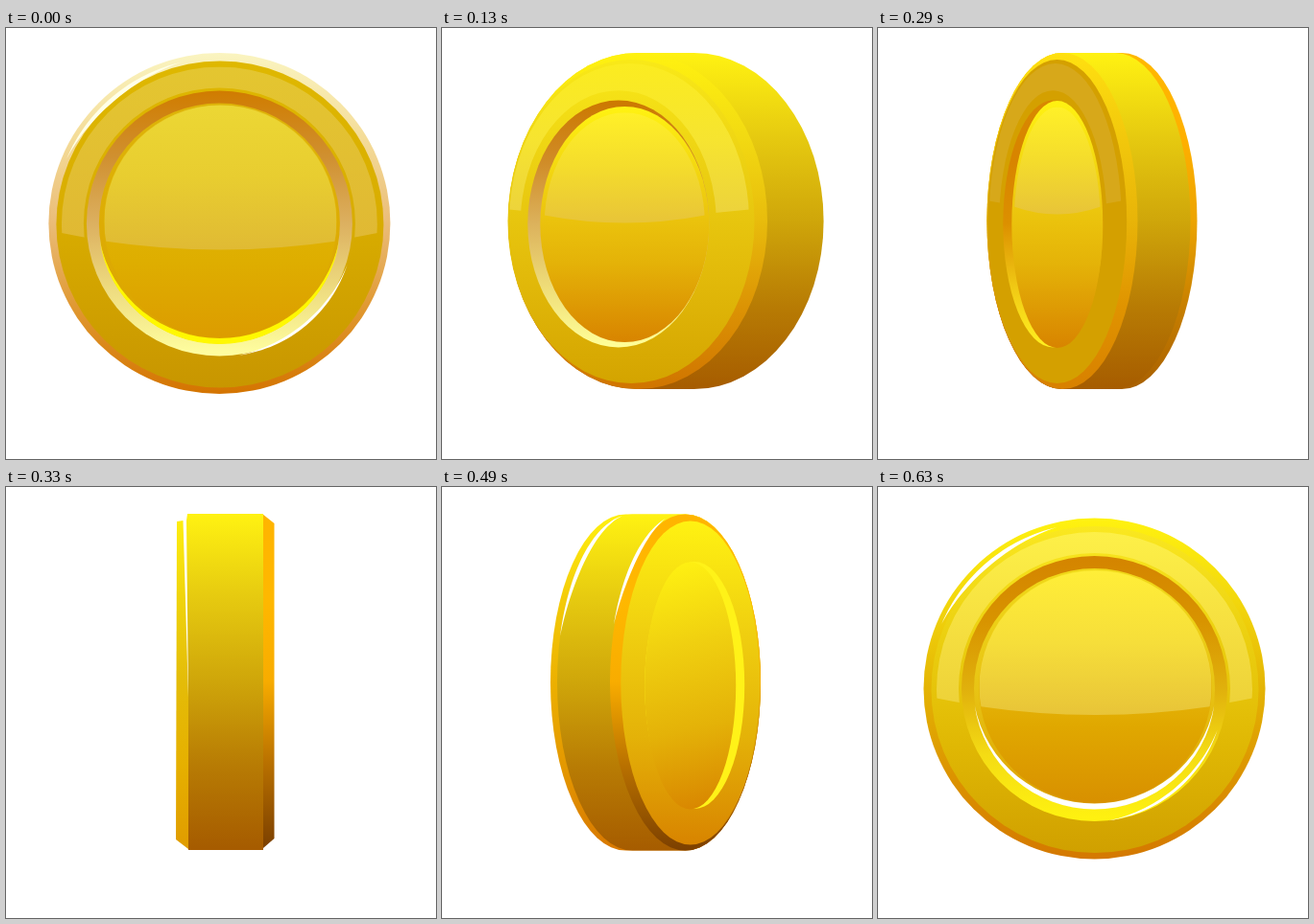
Write an HTML page with a canvas that moves like this. It is 448x450 px and loops after 660 ms.

```html
<!DOCTYPE html>
<html lang="en">
<head>
<meta charset="utf-8">
<title>Spinning coin</title>
<style>
html, body { margin: 0; width: 100%; height: 100%; overflow: hidden; background: #fff; }
canvas { display: block; }
</style>
</head>
<body>
<canvas id="stage" width="448" height="450"></canvas>
<script>
const ctx = document.getElementById('stage').getContext('2d');
const PI = Math.PI;

const METAL = ['#fff212', '#e6ca10', '#cfa60a', '#b87c04', '#a65c00'];
const GOLD = ['#fff212', '#f0d010', '#e4b208', '#d88400'];
const AMBER = ['#ffb400', '#ffb800', '#f8ac00', '#b87000', '#7c4000'];
const SHINE = ['#fff028', '#f4dc2c', '#e8c438'];

// Evenly spaced colour stops from top to bottom; lean tilts the axis.
function ramp(top, bottom, colors, x = 0, lean = 0) {
  const g = ctx.createLinearGradient(x - lean, top, x + lean, bottom);
  colors.forEach((c, i) => g.addColorStop(i / Math.max(1, colors.length - 1), c));
  return g;
}

// Ellipses are [cx, cy, rx, ry].
const circle = (x, y, r) => [x, y, r, r];
const scaled = ([x, y, rx, ry], k) => [x, y, rx * k, ry * k];

function trace([x, y, rx, ry]) {
  ctx.moveTo(x + rx, y);
  ctx.ellipse(x, y, rx, ry, 0, 0, 2 * PI);
}

function oval(e, colors, lean) {
  ctx.beginPath();
  trace(e);
  ctx.fillStyle = ramp(e[1] - e[3], e[1] + e[3], colors, e[0], lean);
  ctx.fill();
}

// Two equal ellipses joined by straight edges.
function barrel(xa, xb, y, rx, ry, colors) {
  ctx.beginPath();
  ctx.ellipse(Math.max(xa, xb), y, rx, ry, 0, -PI / 2, PI / 2);
  ctx.ellipse(Math.min(xa, xb), y, rx, ry, 0, PI / 2, PI * 1.5);
  ctx.fillStyle = ramp(y - ry, y + ry, colors);
  ctx.fill();
}

function poly(pts, colors) {
  ctx.beginPath();
  pts.forEach(p => ctx.lineTo(...p));
  ctx.fillStyle = ramp(28, 376, colors);
  ctx.fill();
}

// Thin highlight along an arc, angles in degrees, tapering at both ends.
function sliver([x, y, rx, ry], from, to, width, color = '#fff') {
  const n = 32;
  const at = (i, inset) => {
    const a = (from + (to - from) * i / n) * PI / 180;
    const d = inset * Math.sin(PI * i / n);
    ctx.lineTo(x + (rx - d) * Math.cos(a), y + (ry - d) * Math.sin(a));
  };
  ctx.beginPath();
  for (let i = 0; i <= n; i++) at(i, 0);
  for (let i = n; i >= 0; i--) at(i, width);
  ctx.fillStyle = color;
  ctx.fill();
}

// Upper part of an ellipse, or of a ring, cut off by a sagging curve.
function gloss(e, hole, bottom, sag, colors) {
  const [x, y, rx, ry] = e;
  ctx.save();
  ctx.beginPath();
  ctx.moveTo(x - rx, y - ry);
  ctx.lineTo(x - rx, bottom);
  ctx.quadraticCurveTo(x, bottom + 2 * sag, x + rx, bottom);
  ctx.lineTo(x + rx, y - ry);
  ctx.clip();
  ctx.beginPath();
  trace(e);
  if (hole) trace(hole);
  ctx.fillStyle = ramp(y - ry, bottom + sag, colors);
  ctx.fill('evenodd');
  ctx.restore();
}

function front(x, y, p) {
  oval(circle(x, y, 178), p.rim);
  oval(circle(x + 0.5, y + 1, 170.5), p.face);
  sliver(circle(x, y, 173), 203, 257, 4.5, p.flash);
  gloss(circle(x, y + 1, 164.5), circle(x, y, 141.5), y + 10, 17, p.gloss);
  oval(circle(x, y, 138.5), p.groove);
  sliver(circle(x - p.slip, y, 139), 18, 82, 3);
  oval(circle(x, y, 125.5), p.ring);
  oval(circle(x + 1, y - 2, 121.5), p.well);
  sliver(circle(x, y, 126), 8, 172, 6, p.glow);
  gloss(circle(x + 1, y - 2, 121), null, y + 18.5, 9, p.shine);
}

// side is -1 when the visible face points left, 1 when it points right.
function turned(axis, y, side, s, p) {
  const at = d => axis + side * d;
  const rim = [at(s.depth), y, s.rx, 175.5];
  const face = [at(36.3), y + 0.5, s.face, 169];
  const groove = [at(s.off), y + 3, s.groove, 129];
  const well = [at(s.off - s.lip), y + 3.5, s.groove - s.lip, s.well];
  const back = at(s.edge - s.depth);

  if (s.edge) barrel(at(-s.depth), rim[0], y, s.rx, 175.5, p.back);
  barrel(back, rim[0], y, s.rx, 175.5, METAL);
  oval(rim, p.rim);
  if (side > 0) {
    sliver(scaled(rim, 1.01), 200, 255, 4);
    if (s.edge) sliver([back, y, s.rx, 175.5], 196, 262, 4.5);
  }
  oval(face, p.face);
  if (p.gloss) gloss([face[0] - 2, y, s.face - 3.5, 164.5], scaled(groove, 1.08), y + s.cut, 7, p.gloss);
  oval(groove, p.groove);
  oval(well, GOLD, p.lean);
  if (p.gloss) gloss(scaled(well, 0.95), null, y + s.cut + 6, 8, SHINE);
}

function edgeOn() {
  poly([[178, 36], [184.5, 35], [190, 220], [190, 378], [177, 368]],
    ['#fff010', '#f0d40c', '#e4bc08', '#e6b000', '#e09c00']);
  poly([[267, 28], [279.5, 38], [279.5, 367], [268, 377]], AMBER);
  poly([[189, 28], [268, 28], [268, 379], [190, 379], [190, 220], [188, 35]], METAL);
}

const wide = { depth: 29.3, rx: 135, face: 128.5, off: 49.5, groove: 94.5, lip: 6.5, well: 123, edge: 0, cut: -12 };
const narrow = { depth: 31, rx: 78.5, face: 72.5, off: 40.7, groove: 52, lip: 4.5, well: 129, edge: 7, cut: -21 };

const pale = {
  rim: ['#faf4c0', '#f4dc98', '#eabc78', '#e09830', '#d47400'],
  face: ['#dfb800', '#d8ac00', '#c89600'],
  gloss: ['#e4c630', '#e0b834'],
  groove: ['#d07c00', '#d09030', '#dcb060', '#eedc80', '#ffffa0'],
  ring: ['#deb408', '#dca400'],
  well: ['#ead030', '#e2b808', '#deae00', '#dc9c00'],
  shine: ['#ecd734', '#e8cd30', '#e0ba34'],
  flash: '#ffffe8', glow: '#fff800', slip: -1
};
const bright = {
  rim: ['#fff210', '#f2d60c', '#e4b404', '#dc9400', '#d47800'],
  face: ['#fae820', '#ecd010', '#e0b804', '#d0a000'],
  gloss: ['#fdf048', '#f6e040', '#ecd038'],
  groove: ['#d48400', '#d89400', '#e0b00c', '#f4dc14', '#fff210'],
  ring: ['#f0d818', '#e8c414', '#dca000'],
  well: ['#fbea30', '#ecc814', '#e0a800', '#d89000'],
  shine: ['#ffee38', '#f6de3a', '#e8c438'],
  flash: '#fff', glow: '#fff', slip: 4
};
const lit = {
  rim: ['#fff210', '#f2da12', '#e8bc0c', '#dc9404', '#d07400'],
  face: ['#f9e918', '#ecd012', '#e2ba0a', '#d4a400'],
  gloss: ['#fbec20', '#f6e430', '#ecd23c'],
  groove: ['#cc7800', '#d08c28', '#dcb25c', '#eedc78', '#ffff98']
};
const dusky = {
  back: ['#ffb800', '#ffb000', '#eca400', '#c88000', '#a86000'],
  rim: ['#ffe010', '#f2c80c', '#e8b408', '#e09400', '#d88000'],
  face: ['#d4a000'],
  gloss: ['#d7a81a'],
  groove: ['#d88800', '#d88400', '#dc9000', '#f0c814', '#fff020']
};
const warm = { rim: AMBER, face: GOLD, groove: ['#d48000', '#d89000', '#e4b40c', '#f6de14', '#fff218'] };
const sunny = {
  back: ['#fff010', '#f4cc08', '#ecb000', '#e49800', '#d87800'],
  rim: AMBER, face: GOLD, groove: ['#fff218'], lean: 30
};

// Each pose holds until its end time.
const poses = [
  [130, () => front(222.4, 204, pale)],
  [230, () => turned(233.3, 201.5, -1, wide, lit)],
  [330, () => turned(223, 201.5, -1, narrow, dusky)],
  [430, edgeOn],
  [530, () => turned(222.5, 204, 1, narrow, sunny)],
  [630, () => turned(233.5, 206, 1, wide, warm)],
  [660, () => front(225.5, 210.5, bright)]
];
let start;

function tick(now) {
  start ??= now;
  const t = (now - start) % 660;
  ctx.fillStyle = '#fff';
  ctx.fillRect(0, 0, 448, 450);
  poses.find(([end]) => t < end)[1]();
  requestAnimationFrame(tick);
}
requestAnimationFrame(tick);
</script>
</body>
</html>
```
